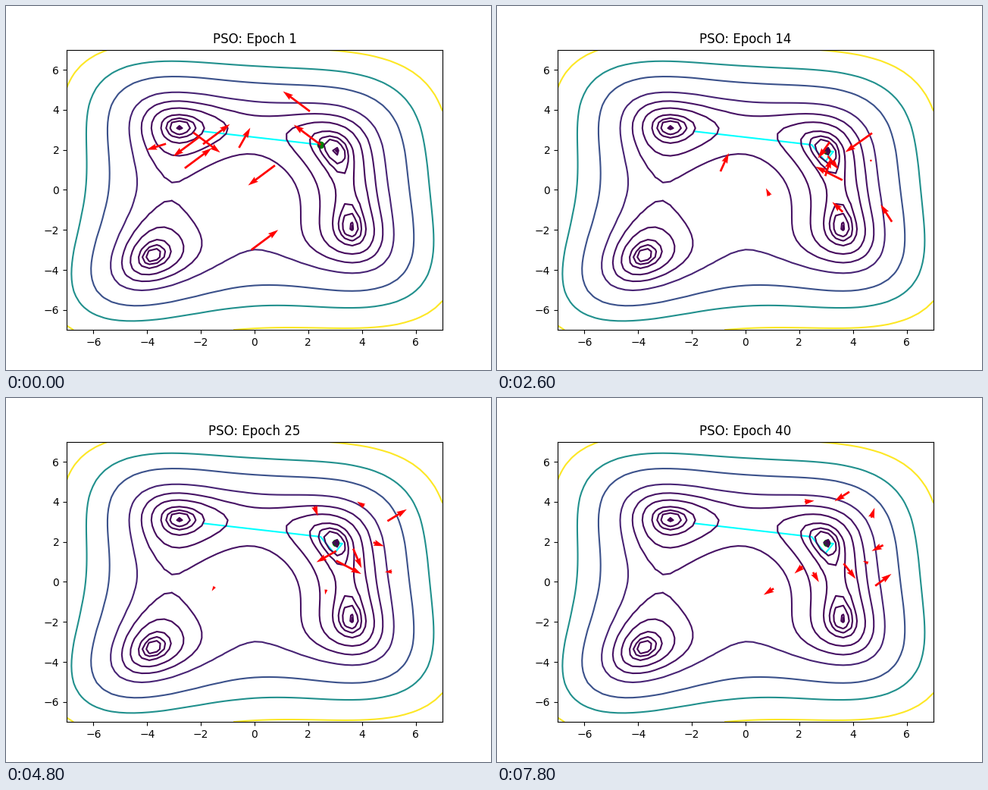
Recreate the animation shown at these times as a matplotlib script. Size 640 by 480 pixels, loop 8 s.

```python
import numpy as np
import matplotlib.pyplot as plt
from matplotlib.animation import FuncAnimation

EPOCHS, INTERVAL = 40, 200
LIMIT = 7
LEVELS = [0.5, 1, 5, 10, 20, 50, 100, 200, 500, 1000, 2000]
INERTIA, PULL, MAX_SPEED = 1.0, 0.2, 1.0

# Best position found so far: first epoch, x, y
BEST = [(0, -1.91, 2.92), (1, 2.46, 2.25), (6, 2.97, 1.42),
        (11, 3.27, 1.91), (13, 3.02, 1.94)]

# Particles at the first epoch: x, y, velocity x, velocity y
START = np.array([
    (2.06, 3.92, -1, 1), (2.46, 2.25, -1, 1), (-0.58, 2.1, 0.42, 1),
    (0.76, 1.22, -1, -1), (-0.12, -3, 1, 1), (-2.6, 1.08, 1, 1),
    (-1.92, 2.28, 1, 1), (-2.28, 2.86, 1, -1), (-2.03, 2.67, -1, -1),
    (-3.3, 2.3, -0.72, -0.3)])


def height(x, y):
    return (x ** 2 + y - 11) ** 2 + (x + y ** 2 - 7) ** 2


def found_by(epoch):
    return [(x, y) for first, x, y in BEST if first <= epoch]


def run_swarm():
    """Position and velocity of every particle at each epoch."""
    rng = np.random.default_rng(4)
    pos, vel = START[:, :2], START[:, 2:]
    own = pos.copy()
    states = [(pos, vel)]
    for epoch in range(2, EPOCHS + 1):
        pos = pos + vel
        better = height(*pos.T) < height(*own.T)
        own[better] = pos[better]
        r1, r2 = rng.random((2,) + pos.shape)
        shared = np.array(found_by(epoch)[-1])
        vel = INERTIA * vel + PULL * (r1 * (own - pos) + r2 * (shared - pos))
        vel = np.clip(vel, -MAX_SPEED, MAX_SPEED)
        states.append((pos, vel))
    return states


SWARM = run_swarm()

fig, ax = plt.subplots(figsize=(6.4, 4.8), dpi=100)
grid = np.linspace(-LIMIT, LIMIT, 51)
X, Y = np.meshgrid(grid, grid)
ax.contour(X, Y, height(X, Y), levels=LEVELS, zorder=2)
ax.set(xlim=(-LIMIT, LIMIT), ylim=(-LIMIT, LIMIT))

# Arrows are sized in pixels so that one unit of speed spans one axis unit
box = ax.get_window_extent()
UNIT = np.array([box.width, box.height]) / (2 * LIMIT)

pos, vel = SWARM[0]
arrows = ax.quiver(*pos.T, *(vel * UNIT).T, color="red", width=0.0055,
                   angles="uv", scale_units="dots", scale=1, zorder=2.1)
trail, = ax.plot([], [], color="cyan", zorder=1.8)
dot, = ax.plot([], [], "o", color="green", zorder=1.9)
title = ax.set_title("PSO: Epoch 1")


def update(i):
    pos, vel = SWARM[i]
    arrows.set_offsets(pos)
    arrows.set_UVC(*(vel * UNIT).T)
    found = found_by(i + 1)
    trail.set_data(*zip(*found))
    dot.set_data(*zip(found[-1]))
    title.set_text(f"PSO: Epoch {i + 1}")
    return arrows, trail, dot, title


anim = FuncAnimation(fig, update, frames=EPOCHS, interval=INTERVAL,
                     repeat=True, repeat_delay=0)
plt.show()
```
